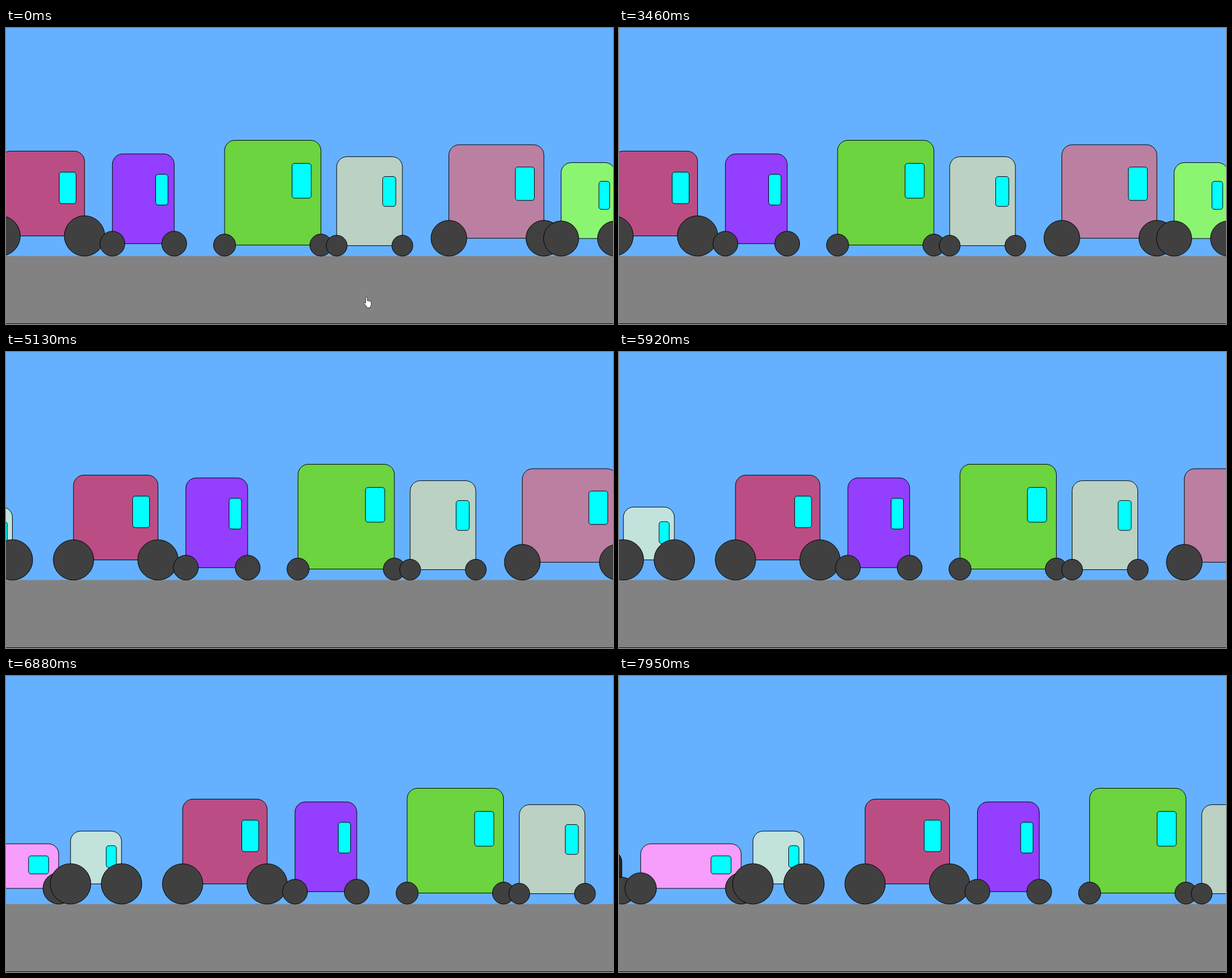
An HTML page for the animation above (8000 ms loop, 1000 by 489 pixels).

```html
<!DOCTYPE html>
<html lang="en">
<head>
<meta charset="utf-8">
<title>Traffic</title>
<style>
  html, body { margin: 0; height: 100%; overflow: hidden; background: #65b1ff; }
  svg { display: block; width: 100%; height: 100%; }
  .line { stroke: #000; stroke-width: .95; }
</style>
</head>
<body>
<svg viewBox="0 0 1000 489" preserveAspectRatio="none">
  <rect width="1000" height="489" fill="#65b1ff"/>
  <path d="M.5 376V.5H1000" fill="none" stroke="#6aa8ea"/>
  <rect y="376.7" width="1000" height="112.3" fill="#828282"/>
  <rect y="488" width="1000" height="1" fill="#111"/>
  <g id="cars"></g>
  <path id="hand" fill="#fff" stroke="#222" stroke-width=".8" stroke-linejoin="round"
    d="M592.6 455V446q0-1.6 1.3-1.6t1.3 1.6v4.6q1.4-.8 2.2.5 1.4-.6 2.1.6 2.2-.5 2.2 1.600v3.500q0 1.800-1.300 3.300v2h-6.200v-1.800l-4.300-5.300q-.8-1.300.4-1.800 1-.2 2.300 1.800z"/>
</svg>
<script>
const GROUND = 376.8, LOOP = 8000;

// left, width, height above ground, wheel radius, colour
const cars = [
  [-564.2, 153.7, 87, 22.2, '#2b2418'],
  [-379.5, 165.5, 99.6, 25.9, '#f79dfc'],
  [-194.5, 84, 120.6, 33.4, '#c2e2dc'],
  [-9.8, 139.2, 173.4, 33.3, '#bb4d85'],
  [175.3, 101.8, 168.8, 20.5, '#943eff'],
  [360.1, 158.7, 191.3, 18.2, '#6bd43e'],
  [544.8, 108.2, 164.2, 17.2, '#bbd1c3'],
  [729.6, 156.5, 183.9, 29.5, '#bb7fa2'],
  [914.5, 89, 154.4, 29, '#8bf571']
];

// time, distance travelled, steps taken since the previous entry
const route = [
  [3930, 0, 0], [4330, 40.4, 4], [5130, 121, 8],
  [5920, 201.7, 8], [6880, 300.8, 10], [7950, 415.2, 11]
];

function drawCar([x, w, h, r, color]) {
  const top = GROUND - h, axle = GROUND - r, c = 17;
  const wheel = cx =>
    `<circle class="line" cx="${cx}" cy="${axle}" r="${r}" fill="#404040"/>`;
  return `<path class="line" fill="${color}" d="M${x} ${axle}V${top + c}a${c} ${c} 0 0 1 ${c} ${-c}
      h${w - 2 * c}a${c} ${c} 0 0 1 ${c} ${c}V${axle}z"/>
    <rect class="line" x="${x + .7 * w}" y="${top + .2 * h}" width="${.2 * w}" height="${.3 * h}"
      rx="4.2" fill="#0ff"/>` + wheel(x) + wheel(x + w);
}

function distance(t) {
  for (let i = 1; i < route.length; i++) {
    const [t0, d0] = route[i - 1], [t1, d1, n] = route[i];
    if (t < t1) {
      const step = Math.max(0, Math.floor((t - t0) / (t1 - t0) * n + .05));
      return d0 + (d1 - d0) * step / n;
    }
  }
  return route[route.length - 1][1];
}

const group = document.getElementById('cars');
const hand = document.getElementById('hand');
group.innerHTML = cars.map(drawCar).join('');

function frame() {
  const t = performance.now() % LOOP;
  group.setAttribute('transform', `translate(${distance(t)} 0)`);
  hand.setAttribute('visibility', t < 110 ? 'visible' : 'hidden');
  requestAnimationFrame(frame);
}
frame();
</script>
</body>
</html>
```
